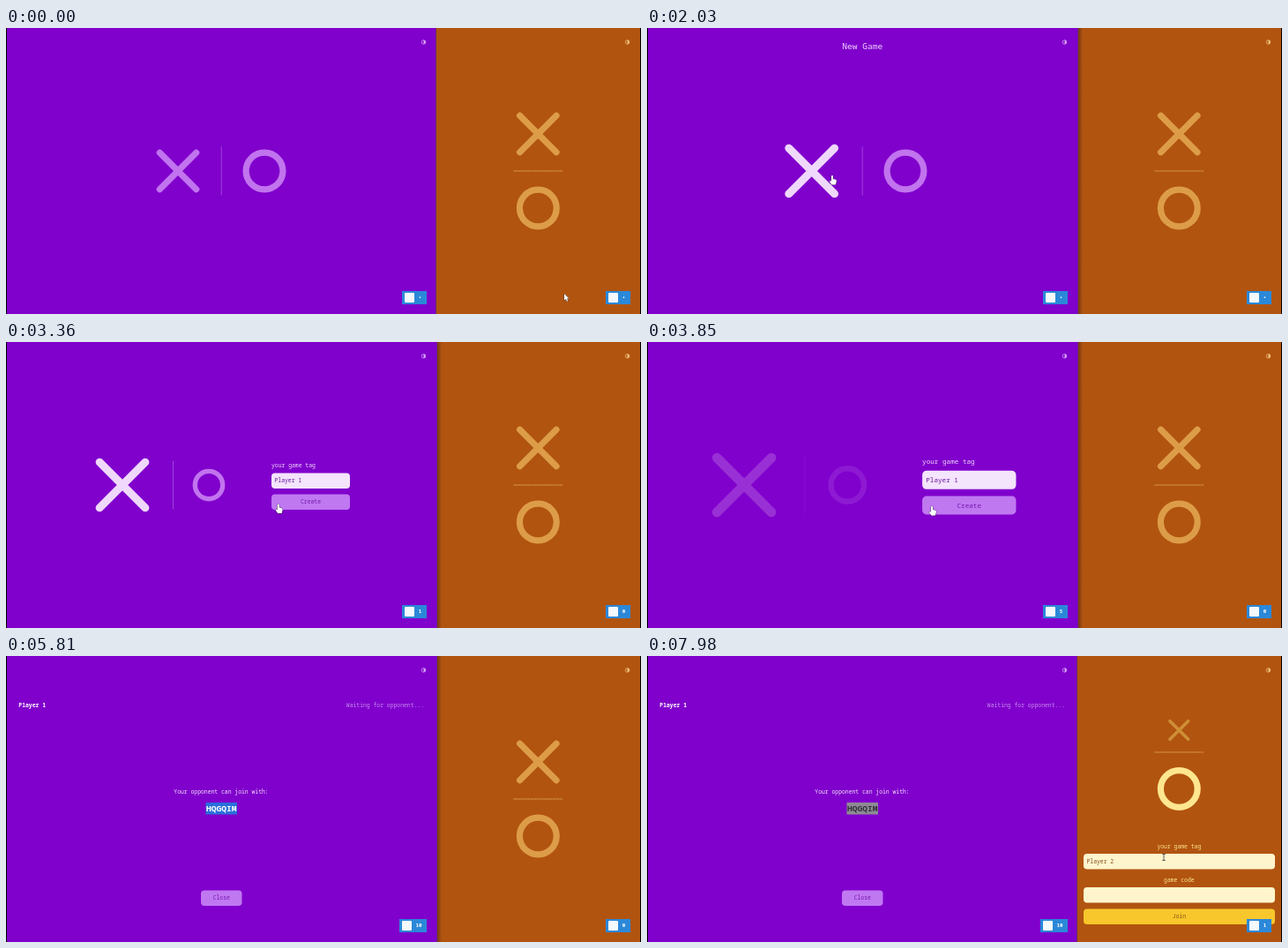
Animation of 720 by 324 pixels, one loop 8000 ms. Source, as an HTML page with a canvas:

```html
<!DOCTYPE html>
<html lang="en">
<head>
<meta charset="utf-8">
<title>X O</title>
<style>
html, body { margin: 0; width: 100%; height: 100%; overflow: hidden; background: #000; }
canvas { display: block; width: 720px; height: 324px; }
</style>
</head>
<body>
<canvas id="stage" width="720" height="324"></canvas>
<script>
const ctx = document.getElementById('stage').getContext('2d');
const LOOP = 8000, STEP = 70;
const SMALL = 6.4, LARGE = 9.6;
const PICK_X = 2100, CREATE = 3620, GAME = 4010, SELECT = 5250, PICK_O = 7210;

const purple = { bg: '#8000cc', mark: '#c174ee', bright: '#efd8fb', line: '#a043df' };
const orange = { bg: '#b15410', mark: '#dd9d48', bright: '#ffe68f', line: '#dea650' };

const mix = (a, b, p) => a + (b - a) * p;
const clamp = v => Math.min(1, Math.max(0, v));
const ease = p => 1 - (1 - p) ** 3;
const smooth = p => p * p * (3 - 2 * p);
const ramp = (t, from, to) => ease(clamp((t - from) / (to - from)));

function mixColor(a, b, p) {
  const part = (c, i) => parseInt(c.substr(1 + 2 * i, 2), 16);
  return `rgb(${[0, 1, 2].map(i => Math.round(mix(part(a, i), part(b, i), p)))})`;
}

function rect(x, y, w, h, color, r = 0) {
  ctx.fillStyle = color;
  ctx.beginPath();
  ctx.roundRect(x, y, w, h, r);
  ctx.fill();
}

function text(str, x, y, color, { size = SMALL, align = 'center', weight = 400 } = {}) {
  ctx.font = `${weight} ${size}px "Noto Sans Mono", "DejaVu Sans Mono", monospace`;
  ctx.textAlign = align;
  ctx.textBaseline = 'alphabetic';
  ctx.fillStyle = color;
  ctx.fillText(str, x, y + size * 0.34);
}

function layer(alpha, scale, cx, cy, draw) {
  if (alpha <= 0) return;
  ctx.save();
  ctx.globalAlpha = alpha;
  ctx.translate(cx, cy);
  ctx.scale(scale, scale);
  ctx.translate(-cx, -cy);
  draw();
  ctx.restore();
}

function cross(x, y, scale, color) {
  const d = 20.7 * scale;
  ctx.strokeStyle = color;
  ctx.lineWidth = 7.2 * scale;
  ctx.lineCap = 'round';
  ctx.beginPath();
  ctx.moveTo(x - d, y - d);
  ctx.lineTo(x + d, y + d);
  ctx.moveTo(x + d, y - d);
  ctx.lineTo(x - d, y + d);
  ctx.stroke();
}

function ring(x, y, scale, color) {
  ctx.strokeStyle = color;
  ctx.lineWidth = 7.2 * scale;
  ctx.beginPath();
  ctx.arc(x, y, 20.9 * scale, 0, Math.PI * 2);
  ctx.stroke();
}

function themeIcon(x, color) {
  ctx.strokeStyle = ctx.fillStyle = color;
  ctx.lineWidth = 0.7;
  ctx.beginPath();
  ctx.arc(x, 16, 2.3, 0, Math.PI * 2);
  ctx.stroke();
  ctx.beginPath();
  ctx.arc(x, 16, 2.3, -Math.PI / 2, Math.PI / 2);
  ctx.fill();
}

function badge(right, label) {
  const w = label.length > 1 ? 31 : 28;
  const x = right - w;
  rect(x, 298, w, 15, '#2b88d8');
  rect(x + 3, 300, 11, 11, '#f4f9fd', 1);
  text(label, x + (w + 13) / 2, 305.5, '#fff', { size: 5.8, weight: 700 });
}

function button(label, x, y, w, color, ink, h = 17.5) {
  rect(x, y, w, h, color, 4);
  text(label, x + w / 2, y + h / 2, ink);
}

function field(value, x, y, w, color, ink) {
  rect(x, y, w, 17.5, color, 4);
  text(value, x + 3.5, y + 8.5, ink, { align: 'left' });
}

function leftMenu(t) {
  const hover = ramp(t, 1050, 1300);
  const open = ramp(t, PICK_X, 2380);
  const shift = -54.7 * open;
  cross(mix(195, 186.7, hover) + shift, 162, mix(1, 1.25, hover),
    mixColor(purple.mark, purple.bright, hover));
  rect(243.7 + shift, 134.5, 1, 55, purple.line);
  const over = ramp(t, 2310, 2520) * (1 - ramp(t, 2870, 3080));
  ring(293 + shift - 8.3 * open, 162, mix(1, 0.75, open),
    mixColor(purple.mark, '#d08cf3', over));

  layer(open, 1, 244, 162, () => {
    const x = mix(330, 301, open);
    text('your game tag', x, 140, purple.bright, { align: 'left' });
    field('Player 1', x, 148.5, 89, '#f4e4fc', '#6c18a5');
    button('Create', x, 172.5, 89, '#c078f1', '#7419ae');
  });
}

function leftTitle(t) {
  const draw = (name, alpha) => layer(alpha, 1, 244, 21, () =>
    text(name, 244.3, 21, purple.bright, { size: LARGE }));
  draw('New Game', ramp(t, 1050, 1300) * (1 - ramp(t, 2170, 2380)));
  draw('Join Game', ramp(t, 2310, 2520) * (1 - ramp(t, 2870, 3080)));
}

function lobby(t) {
  text('Player 1', 14.3, 55.5, '#fff', { align: 'left', weight: 700 });
  text('Waiting for opponent...', 474, 55.5, '#c78bef', { align: 'right' });
  text('Your opponent can join with:', 244, 154, '#f3e2fc');
  const focused = t < PICK_O;
  const selected = t >= SELECT;
  if (selected) rect(226.5, 166, 35.5, 13.5, focused ? '#2b6fdc' : '#8d8b94');
  text('HQGQIM', 244.3, 173, selected && !focused ? '#34303a' : '#fff',
    { size: LARGE, weight: 700 });
  button('Close', 221, 265.5, 46.5, '#c078f1', '#7419ae');
}

function leftWindow(t) {
  rect(1, 0, 487, 324, purple.bg);
  themeIcon(473.5, '#d9a5f5');
  leftTitle(t);
  if (t < GAME) {
    const leave = clamp((t - CREATE) / 295);
    layer(1 - leave, 1 + 0.25 * leave, 244, 162, () => leftMenu(t));
  } else {
    const enter = ramp(t, GAME, 4340);
    layer(enter, mix(0.8, 1, enter), 244, 162, () => lobby(t));
  }
  const count = t < PICK_X ? '•' : t < CREATE + 70 ? '1' : t < GAME ? '5' : '10';
  badge(477, count);
}

function rightWindow(t) {
  rect(488, 0, 231, 324, orange.bg);
  themeIcon(704.5, '#f3c67d');
  const hover = ramp(t, 6940, 7170);
  const open = ramp(t, PICK_O, 7560);
  const shift = -53 * open;

  cross(603.3, mix(120, 84, open), mix(1, 0.5, open), mixColor(orange.mark, '#cf8f36', open));
  ctx.strokeStyle = orange.line;
  ctx.lineWidth = 1;
  ctx.lineCap = 'butt';
  ctx.setLineDash([2, 0.6]);
  ctx.beginPath();
  ctx.moveTo(575.5, 162 + shift);
  ctx.lineTo(631, 162 + shift);
  ctx.stroke();
  ctx.setLineDash([]);
  const scale = mix(1, 1.25, hover) - 0.25 * open;
  ring(603.3, mix(mix(204, 212, hover), 150.5, open), scale,
    mixColor(orange.mark, orange.bright, hover));

  layer(hover * (1 - ramp(t, 7350, 7560)), 1, 603, 21, () =>
    text('Join Game', 603.5, 21, orange.bright, { size: LARGE }));

  layer(open, 1, 603, 162, () => {
    ctx.translate(0, 30 * (1 - open));
    const ink = '#87501f';
    text('your game tag', 603.3, 215.5, orange.bright);
    field('Player 2', 495, 224, 217, '#fff5cd', ink);
    text('game code', 603.3, 254, orange.bright);
    field('', 495, 262, 217, '#fff5cd', ink);
    button('Join', 495, 286.5, 217, '#f8c72b', ink);
  });
  badge(708, t < PICK_X ? '•' : t < PICK_O ? '0' : '1');
}

function seam(leftFront) {
  if (!leftFront) {
    rect(487, 0, 1, 324, '#6a2870');
    return;
  }
  rect(488, 0, 1, 324, '#6e1f94');
  const shade = ctx.createLinearGradient(489, 0, 494, 0);
  shade.addColorStop(0, 'rgba(60,30,20,.5)');
  shade.addColorStop(1, 'rgba(60,30,20,0)');
  rect(489, 0, 5, 324, shade);
}

const track = [
  [0, 633, 301], [140, 633, 301], [980, 213, 167], [1820, 210, 167], [2870, 210, 167],
  [3500, 323, 186], [4060, 323, 186], [4620, 262, 172], [5880, 262, 172],
  [6860, 573, 217], [6930, 573, 217], [7140, 600, 206], [7420, 600, 206],
  [7980, 586, 228], [8000, 586, 228]
];
const cursors = [
  [980, 'arrow'], [2900, 'hand'], [3360, 'arrow'], [4060, 'hand'], [4500, 'arrow'],
  [5900, 'none'], [6860, 'arrow'], [7420, 'hand'], [7750, 'arrow'], [LOOP, 'beam']
];
const shapes = {
  arrow: new Path2D('M0 0V7.6L1.8 6 3 8.7 4.2 8.2 3 5.5H5.3Z'),
  hand: new Path2D('M-1 .6Q0-.6 1 .6V4L4.2 4.8Q5 5.2 4.8 7L3.8 10.5H-.6L-3 7Q-3.2 5.6-1 6.6Z'),
  beam: new Path2D('M-1.7-3.5H1.7M0-3.5V3.5M-1.7 3.5H1.7')
};

function cursor(t) {
  const kind = cursors.find(c => t < c[0])[1];
  if (kind === 'none') return;
  const i = track.findIndex(k => t < k[0]);
  const [t0, x0, y0] = track[i - 1], [t1, x1, y1] = track[i];
  const p = smooth((t - t0) / (t1 - t0));
  ctx.save();
  ctx.translate(mix(x0, x1, p), mix(y0, y1, p));
  ctx.lineWidth = 0.8;
  ctx.strokeStyle = '#34303a';
  ctx.stroke(shapes[kind]);
  if (kind !== 'beam') {
    ctx.fillStyle = '#fff';
    ctx.fill(shapes[kind]);
  }
  ctx.restore();
}

function frame(now) {
  const t = Math.floor((now % LOOP) / STEP) * STEP;
  rect(0, 0, 720, 324, '#000');
  leftWindow(t);
  rightWindow(t);
  seam(t >= 840 && t < PICK_O);
  cursor(t);
}

const start = performance.now();
function tick() {
  frame(performance.now() - start);
  requestAnimationFrame(tick);
}
tick();
</script>
</body>
</html>
```
